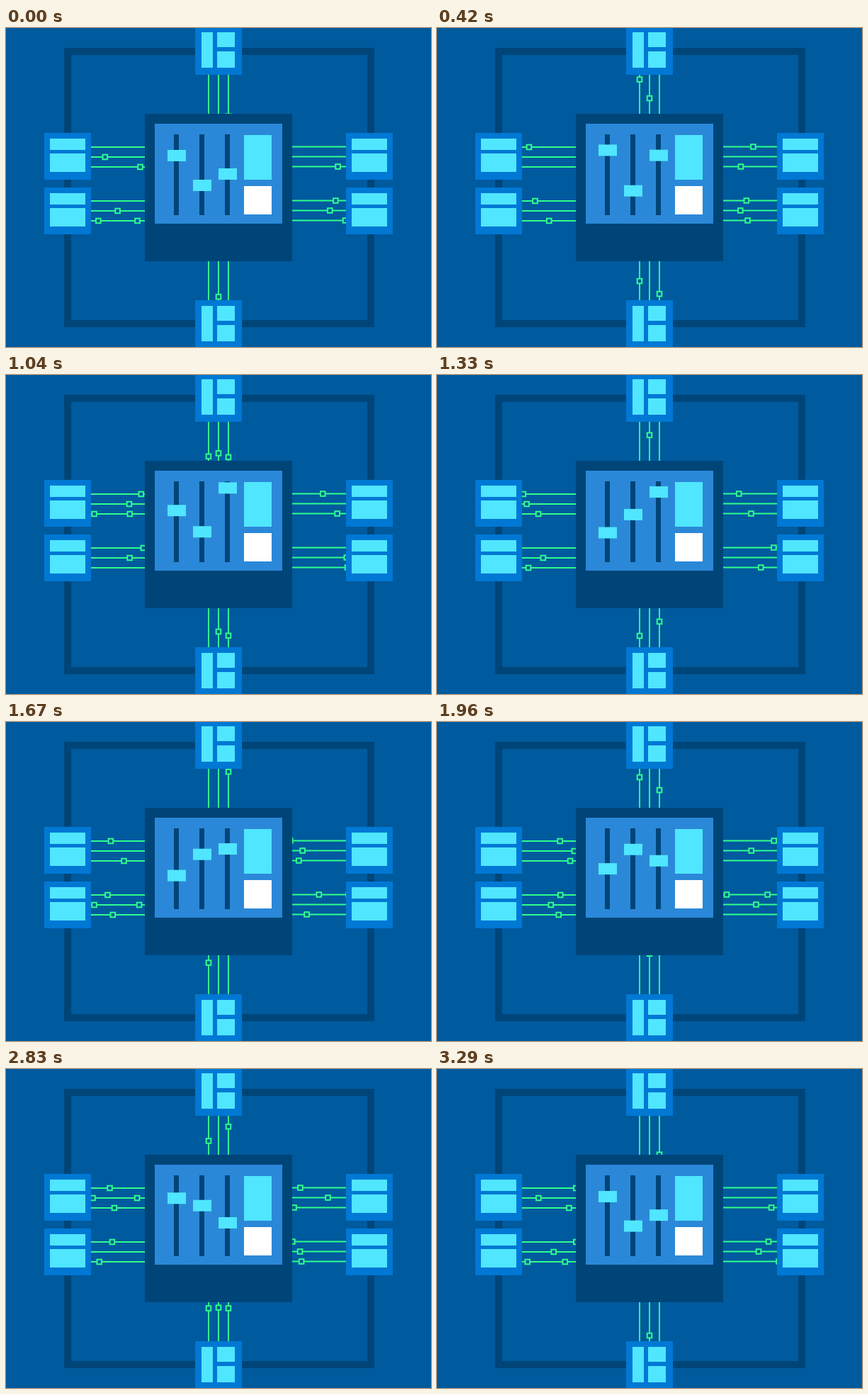
An HTML page that plays this animation: 600 px wide and 450 px high, repeating every 3.33 s.

```html
<!DOCTYPE html>
<html lang="en">
<head>
<meta charset="utf-8">
<title>Control panel and modules</title>
<style>
  html, body { margin: 0; width: 100%; height: 100%; overflow: hidden; background: #005a9e; }
  svg { display: block; width: 100%; height: 100%; }
</style>
</head>
<body>
<svg id="stage" viewBox="0 0 600 450"></svg>
<script>
const LOOP = 3330, FPS = 24, FRAMES = 80;
const COLOR = {
  back: '#005a9e', dark: '#004578', module: '#0078d4',
  panel: '#2b88d8', cyan: '#50e6ff', wire: '#2eff8c', white: '#fff'
};
const stage = document.getElementById('stage');

function add(tag, attrs, parent = stage) {
  const el = document.createElementNS('http://www.w3.org/2000/svg', tag);
  for (const key in attrs) el.setAttribute(key, attrs[key]);
  return parent.appendChild(el);
}
const rect = (x, y, width, height, fill, parent) => add('rect', { x, y, width, height, fill }, parent);

// One bundle of three wires is turned to each side; only its phase differs.
const REACH = 213, GAP = 14, REFERENCE = .375;
const BUNDLES = [
  { x: 87,  y: 182,   turn: 0,   phase: 857 },
  { x: 87,  y: 258,   turn: 0,   phase: 3052 },
  { x: 513, y: 181.5, turn: 180, phase: 424 },
  { x: 513, y: 257.5, turn: 180, phase: 1630 },
  { x: 300, y: 33,    turn: 90,  phase: 2176 },
  { x: 300, y: 417,   turn: -90, phase: 668 }
];
// Packets on each wire: ms at reference progress, loops of travel per second.
const WIRES = [
  [[884, .29], [2050, .35], [3155, .325]],
  [[297, -.56], [1555, -.277], [2305, -.298]],
  [[0, .36], [640, .235], [1994, .235]]
];

// Knob heights at shared moments; the last moment returns to the first height.
const MOMENTS = [0, 790, 1330, 1960, 2460, 2830, LOOP];
const SLIDERS = [
  { x: 228, heights: [180, 166, 222.5, 207, 184.3, 182.3] },
  { x: 264, heights: [222, 236.3, 197, 179.7, 167.7, 192.7] },
  { x: 300, heights: [206, 157.3, 165, 196, 226.3, 217] }
];

add('rect', { x: 87, y: 33, width: 428, height: 384, fill: 'none', stroke: COLOR.dark, 'stroke-width': 10 });

const packets = [];
for (const { x, y, turn, phase } of BUNDLES) {
  const group = add('g', { transform: `translate(${x} ${y}) rotate(${turn})` });
  WIRES.forEach((trips, i) => {
    const offset = (i - 1) * GAP;
    rect(0, offset - 1, REACH, 2, COLOR.wire, group);
    for (const [at, rate] of trips) {
      const el = add('rect', {
        y: offset - 3.3, width: 6.6, height: 6.6,
        fill: COLOR.back, stroke: COLOR.wire, 'stroke-width': 2
      }, group);
      packets.push({ el, at: at + phase, rate });
    }
  });
}

for (const x of [54, 480]) {
  for (const y of [148, 225]) {
    rect(x, y, 66, 66, COLOR.module);
    rect(x + 8, y + 8, 50, 16, COLOR.cyan);
    rect(x + 8, y + 29, 50, 26, COLOR.cyan);
  }
}
for (const y of [-2, 384]) {
  rect(267, y, 66, 68, COLOR.module);
  rect(276, y + 8, 16, 50, COLOR.cyan);
  rect(298, y + 8, 25, 21, COLOR.cyan);
  rect(298, y + 35, 25, 23, COLOR.cyan);
}

rect(196, 121, 208, 208, COLOR.dark);
rect(210, 135, 180, 141, COLOR.panel);
rect(336, 151, 39, 63, COLOR.cyan);
rect(336, 223, 39, 40, COLOR.white);
for (const slider of SLIDERS) {
  rect(slider.x + 9, 150, 7, 114, COLOR.dark);
  slider.knob = rect(slider.x, 0, 26, 16, COLOR.cyan);
}

const smooth = s => s * s * (3 - 2 * s);
const clamp = s => Math.max(0, Math.min(1, s));
// Signed distance in time around the loop.
const wrap = t => t - LOOP * Math.round(t / LOOP);

// Monotone cubic through the heights, flat at the turning points.
function glide(heights, t) {
  const last = heights.length;
  const value = i => heights[i % last];
  const slope = i => (value(i + 1) - value(i)) / (MOMENTS[i + 1] - MOMENTS[i]);
  const tangent = i => {
    if (i === 0 || i === last) return 0;
    const a = slope(i - 1), b = slope(i);
    return a * b > 0 ? 2 * a * b / (a + b) : 0;
  };
  const i = MOMENTS.findIndex(m => m > t) - 1;
  const h = MOMENTS[i + 1] - MOMENTS[i];
  const u = (t - MOMENTS[i]) / h, v = 1 - u;
  return value(i) + (value(i + 1) - value(i)) * smooth(u)
    + h * u * v * (v * tangent(i) - u * tangent(i + 1));
}

function draw(ms) {
  const frame = Math.min(FRAMES - 1, Math.floor((ms % LOOP + 5) * FPS / 1000));
  const t = frame * LOOP / FRAMES;
  for (const { el, at, rate } of packets) {
    const s = clamp(REFERENCE + rate * wrap(t - at) / 1000);
    el.setAttribute('x', (REACH * smooth(s) - 3.3).toFixed(2));
  }
  for (const { knob, heights } of SLIDERS) knob.setAttribute('y', (glide(heights, t) - 8).toFixed(2));
}

const began = performance.now();
function tick() {
  draw(performance.now() - began);
  requestAnimationFrame(tick);
}
tick();
</script>
</body>
</html>
```
